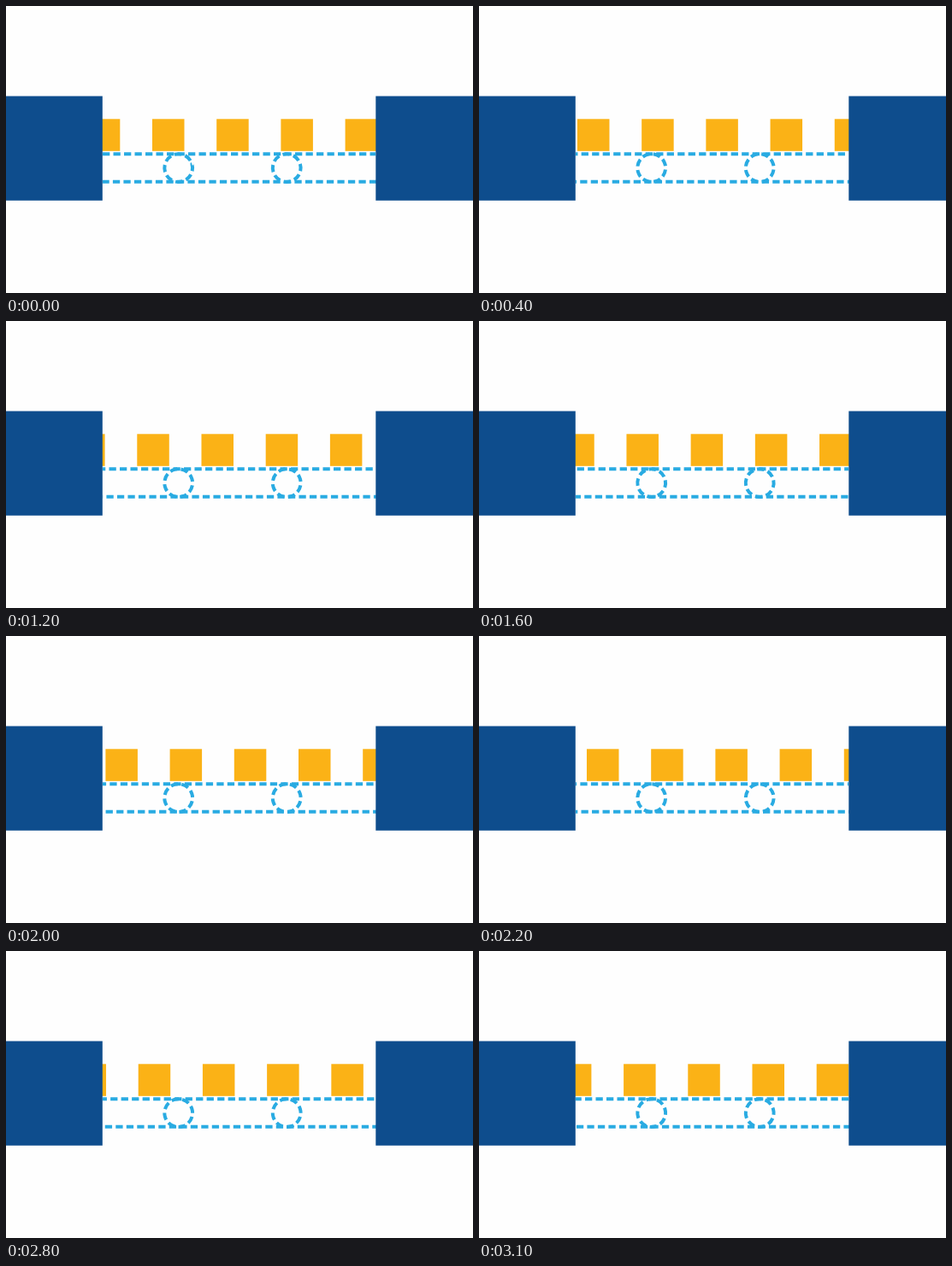
An HTML page for the animation above (3.2 s loop, 546 by 336 pixels).

```html
<!DOCTYPE html>
<html lang="en">
<head>
<meta charset="utf-8">
<title>Conveyor</title>
<style>
  html, body { margin: 0; width: 100%; height: 100%; overflow: hidden; background: #fefefe; }
  svg { display: block; width: 546px; height: 336px; }
  #scene { filter: blur(0.6px); }
  .belt { fill: none; stroke: #29abe2; stroke-width: 4; stroke-dasharray: 8.3 4.2; }
</style>
</head>
<body>
<svg viewBox="0 0 546 336">
  <g id="scene">
    <g id="boxes" fill="#fbb216"></g>
    <path class="belt" d="M113 173.3H432"/>
    <path class="belt" d="M433.2 205.7H113"/>
    <circle class="belt" pathLength="100" cx="201.7" cy="189.6" r="16.4" transform="rotate(-17 201.7 189.6)"/>
    <circle class="belt" pathLength="100" cx="328.2" cy="189.6" r="16.4" transform="rotate(-17 328.2 189.6)"/>
    <path fill="#0e4d8d" d="M-9 105.5H112.8V227.7H-9ZM432.3 105.5H555V227.7H432.3Z"/>
  </g>
</svg>
<script>
const LOOP = 3200, STEP = 100, SPEED = 4.79;
const SPACING = 75.2, BOX = 37.5, START = 20.6;
const boxes = document.getElementById("boxes");
const belts = document.querySelectorAll(".belt");

for (let i = 0; i < 6; i++) {
  const box = document.createElementNS("http://www.w3.org/2000/svg", "rect");
  for (const [name, value] of Object.entries({ x: i * SPACING, y: 132.3, width: BOX, height: BOX }))
    box.setAttribute(name, value);
  boxes.append(box);
}

// Boxes, belt and rollers all advance by the same distance per step.
function draw(now) {
  const travel = Math.floor((now % LOOP) / STEP) * SPEED;
  boxes.setAttribute("transform", `translate(${(START + travel) % SPACING})`);
  for (const belt of belts) belt.style.strokeDashoffset = -travel;
  requestAnimationFrame(draw);
}
requestAnimationFrame(draw);
</script>
</body>
</html>
```
